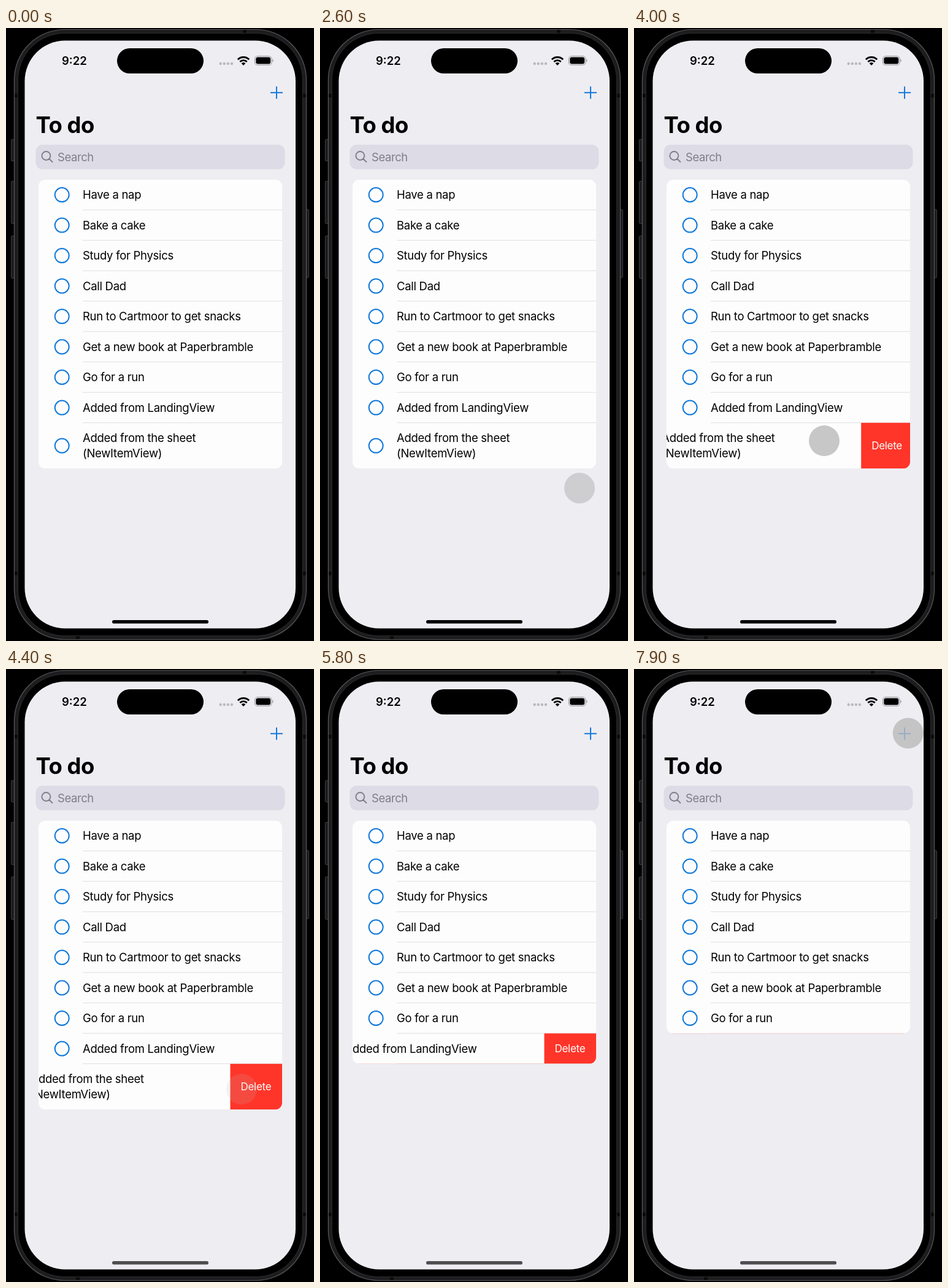
These frames come from a looping animation (502x998 px, 8 s). An HTML page:

```html
<!DOCTYPE html>
<html lang="en">
<head>
<meta charset="utf-8">
<title>To do</title>
<style>
  html, body { margin: 0; width: 100%; height: 100%; overflow: hidden; background: #000; }
  svg { display: block; width: 502px; height: 998px; }
  text { font: 18.5px Inter, sans-serif; letter-spacing: -.29px; font-optical-sizing: none; white-space: pre; }
  .time { font-weight: 600; letter-spacing: 0; }
  .title { font-size: 36.5px; font-weight: 700; letter-spacing: -.5px; }
  .search { fill: #7f7e87; letter-spacing: -.42px; }
  .delete { font-size: 17px; fill: #fff; }
  .ring { fill: none; stroke: #1279da; stroke-width: 2; }
</style>
</head>
<body>
<svg viewBox="0 0 502 998">
  <defs>
    <clipPath id="cardClip"><rect id="cardShape" x="53" y="247" width="397" rx="11"/></clipPath>
  </defs>

  <!-- Phone body -->
  <g fill="#1b1b1d" stroke="#3a3a3c">
    <rect x="8.5" y="181.5" width="6" height="35" rx="1.5"/>
    <rect x="8.5" y="249.5" width="6" height="69" rx="1.5"/>
    <rect x="8.5" y="338.5" width="6" height="69" rx="1.5"/>
    <rect x="487.5" y="295.5" width="6" height="111" rx="1.5"/>
  </g>
  <rect x="13.5" y="2.5" width="476" height="993" rx="82" fill="#1d1d1f" stroke="#59595b" stroke-width="1.2"/>
  <path d="M14 110h7M482 110h7M14 888h7M482 888h7M389 3v6M117 989v6" stroke="#0b0b0c" stroke-width="6"/>
  <rect x="19.5" y="8.5" width="464" height="981" rx="76" stroke="#2b2b2d"/>
  <rect x="30.5" y="20.5" width="441.5" height="957" rx="66" fill="#eeedf2"/>

  <!-- Status bar -->
  <text class="time" x="91" y="60">9:22</text>
  <rect x="181" y="33" width="141" height="41" rx="20.5"/>
  <path d="M349.7 58h19" stroke="#bab9be" stroke-width="4.4" stroke-linecap="round" stroke-dasharray="0 6.1"/>
  <path d="M377.8 51.3a13 13 0 0 1 18.4 0M381.3 55a8.2 8.2 0 0 1 11.4 0" fill="none" stroke="#000" stroke-width="2.8"/>
  <path d="M387 61l-3.4-3.5a5 5 0 0 1 6.8 0z"/>
  <rect x="405.5" y="45.7" width="27.5" height="14.6" rx="4.6" fill="none" stroke="#97969b" stroke-width="1.1"/>
  <rect x="407.3" y="47.5" width="23.9" height="11" rx="3"/>
  <path d="M434.4 50.5a3 3 0 0 1 0 5z" fill="#97969b"/>

  <!-- Header -->
  <path d="M431 105.3h20M441 95.3v20" stroke="#1279da" stroke-width="2"/>
  <text class="title" x="48.5" y="171">To do</text>
  <rect x="48.5" y="190" width="406" height="40" rx="11" fill="#dddbe5"/>
  <path d="M72.4 208a7 7 0 1 1-14 0a7 7 0 1 1 14 0M70.5 213l5 5" fill="none" stroke="#7f7e87" stroke-width="1.9" stroke-linecap="round"/>
  <text class="search" x="84" y="217">Search</text>

  <g id="card" clip-path="url(#cardClip)">
    <rect x="53" y="247" width="397" height="470" fill="#fdfdfd"/>
  </g>
  <rect id="home" x="173" y="964" width="157" height="5.6" rx="2.8"/>
  <g id="touches" fill="#bbb"></g>
</svg>

<script>
const $ = id => document.getElementById(id);
const LOOP = 8000, TOP = 246.8, PITCH = 49.5, TALL = 74.5, WIDTH = 397;
const OPEN = 84.5, FADE = 250;

const items = [
  "Have a nap", "Bake a cake", "Study for Physics", "Call Dad",
  "Run to Cartmoor to get snacks", "Get a new book at Paperbramble",
  "Go for a run", "Added from LandingView", "Added from the sheet\n(NewItemView)"
];

function addRow(item, i) {
  const lines = item.split("\n"), top = TOP + i * PITCH;
  const height = lines.length > 1 ? TALL : PITCH, mid = top + height / 2;
  const baseline = mid + 6.6 - (lines.length - 1) * 12.5;
  const texts = lines.map((s, n) => `<text x="125" y="${baseline + n * 25}">${s}</text>`).join("");
  const separator = i < items.length - 1
    ? `<rect x="125" y="${top + PITCH - .6}" width="325" height="1" fill="#dfdfe1"/>` : "";
  $("card").insertAdjacentHTML("beforeend", `
    <g id="row${i}"><circle class="ring" cx="91.2" cy="${mid}" r="11.5"/>${texts}
      <rect x="450" y="${top}" width="${WIDTH}" height="${height}" fill="#ff3529"/>
      <text class="delete" x="467" y="${mid + 6}">Delete</text></g>${separator}`);
}
items.forEach(addRow);

// Rows opened by a swipe, then deleted by a tap.
const deletions = [
  { row: 8, swipe: 3700, tap: 4600, height: TALL },
  { row: 7, swipe: 5250, tap: 6200, height: PITCH }
];

// Each move is start, duration, dx, dy.
const touches = [
  { on: 2430, off: 4000, x: 423, y: 740, moves: [[2500, 300, 0, 35], [2800, 600, -11, -108], [3700, 300, -102, 5]] },
  { on: 4330, off: 4620, x: 384, y: 684, moves: [] },
  { on: 4850, off: 5500, x: 415, y: 626, moves: [[5250, 250, -102, 0]] },
  { on: 5900, off: 6370, x: 410, y: 613.6, moves: [] },
  { on: 7620, off: LOOP, x: 446.7, y: 104.5, moves: [] }
];
$("touches").innerHTML = touches.map(() => `<circle r="25"/>`).join("");

function ease(t, start, duration) {
  const p = Math.min(1, Math.max(0, (t - start) / duration));
  return p * p * (3 - 2 * p);
}

function draw(now) {
  const t = Math.floor(now % LOOP / 100) * 100;

  let bottom = TOP + 8 * PITCH + TALL;
  for (const { row, swipe, tap, height } of deletions) {
    const shift = OPEN * ease(t, swipe, 350) + (WIDTH - OPEN) * ease(t, tap, 200);
    $("row" + row).setAttribute("transform", `translate(${-shift})`);
    bottom -= height * ease(t, tap, 300);
  }
  $("cardShape").setAttribute("height", bottom - 247);

  touches.forEach(({ on, off, x, y, moves }, i) => {
    for (const [start, duration, dx, dy] of moves) {
      const p = ease(t, start, duration);
      x += dx * p;
      y += dy * p;
    }
    const dot = $("touches").children[i];
    dot.setAttribute("transform", `translate(${x} ${y})`);
    dot.setAttribute("opacity", .8 * (ease(t, on, FADE) - ease(t, off, FADE)));
  });

  const dimmed = t >= 4200 && t < 4800 || t >= 5800;
  $("home").setAttribute("fill", dimmed ? "#4e4e50" : "#000");
  requestAnimationFrame(draw);
}
requestAnimationFrame(draw);
</script>
</body>
</html>
```
